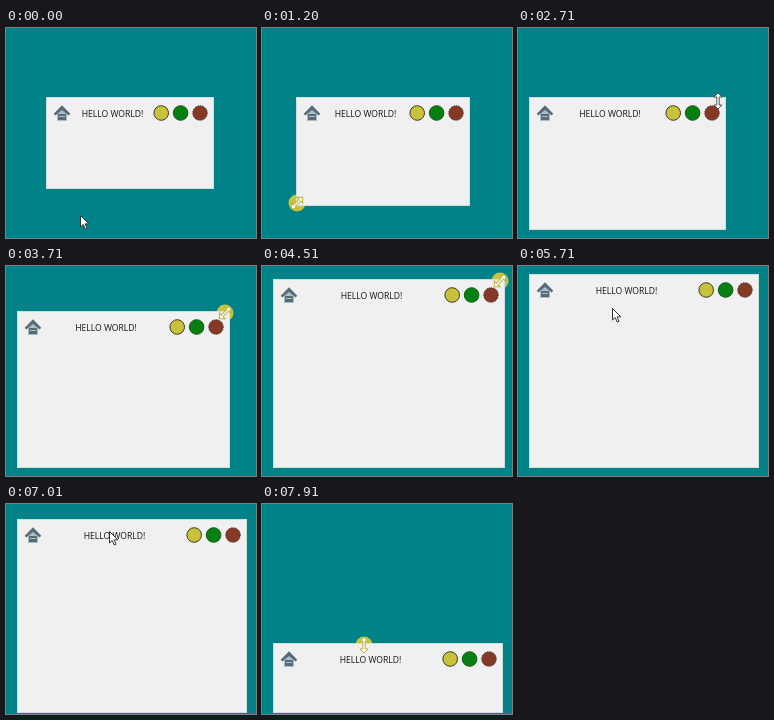
Recreate the animation shown at these times as an HTML page with a canvas. Size 250 by 210 pixels, loop 8000 ms.

```html
<!DOCTYPE html>
<html lang="en">
<head>
<meta charset="utf-8">
<title>Window resize</title>
<style>
  html, body { margin: 0; width: 100%; height: 100%; overflow: hidden; background: #008288; }
  canvas { display: block; width: 250px; height: 210px; }
</style>
</head>
<body>
<canvas id="stage"></canvas>
<script>
const canvas = document.getElementById('stage');
const ctx = canvas.getContext('2d');
const LOOP = 8000;
const RELEASE_DELAY = 200;
const TEAL = '#008288', YELLOW = '#cbc33c';

// Dragged edges follow the cursor, so only the cursor's moves are described.
const moves = [];
function move(start, end, x, y, kind, options = {}) {
  moves.push({ start, end, x, y, kind, drag: '', bow: [0, 0], ...options });
}

move(0, 400, 44, 161, 'arrow');
move(500, 700, 41, 158, 'diagonal');
move(1000, 1900, 12, 199, 'diagonal', { drag: 'left bottom', settle: true });
move(2210, 2610, 199, 73, 'arrow');
move(2610, 3010, 203, 71, 'vertical');
move(3010, 3110, 203, 71, 'diagonal');
move(3310, 4210, 240, 18, 'diagonal', { drag: 'right top' });
move(4210, 4910, 236, 10, 'diagonal', { drag: 'right top' });
move(5110, 6010, 103, 22, 'arrow', { bow: [-62, 28] });
move(6110, 6410, 112, 33, 'arrow', { drag: 'left top right bottom' });
move(6410, 6610, 99, 33, 'arrow', { drag: 'left top right bottom' });
move(6610, 6710, 103, 29, 'arrow', { drag: 'left top right bottom' });
move(6910, 7210, 103, 22, 'arrow');
move(7210, 7310, 102, 17, 'vertical');
move(7510, 7910, 102, 141, 'vertical', { drag: 'top' });

function sceneAt(time) {
  const box = { left: 40, top: 69, right: 208, bottom: 161 };
  let x = 74, y = 187, current = moves[0];
  for (const step of moves) {
    if (time <= step.start) break;
    current = step;
    const p = Math.min(1, (time - step.start) / (step.end - step.start));
    const swing = p < 1 ? Math.sin(Math.PI * p) : 0;
    const dx = (step.x - x) * p + step.bow[0] * swing;
    const dy = (step.y - y) * (step.settle ? 1 - (1 - p) ** 2.2 : p) + step.bow[1] * swing;
    x += dx;
    y += dy;
    for (const edge of step.drag.split(' ').filter(Boolean)) {
      box[edge] += edge === 'left' || edge === 'right' ? dx : dy;
    }
  }
  for (const edge in box) box[edge] = Math.round(box[edge]);
  const pressed = current.drag !== '' && time < current.end + RELEASE_DELAY;
  return { box, x: Math.round(x), y: Math.round(y), kind: current.kind, pressed };
}

function polygon(points, fill, stroke) {
  ctx.beginPath();
  points.forEach(([x, y]) => ctx.lineTo(x, y));
  ctx.closePath();
  ctx.fillStyle = fill;
  ctx.fill();
  if (stroke) { ctx.strokeStyle = stroke; ctx.stroke(); }
}

function disc(x, y, radius, fill, stroke, dash = []) {
  ctx.beginPath();
  ctx.arc(x, y, radius, 0, Math.PI * 2);
  ctx.fillStyle = fill;
  ctx.fill();
  if (!stroke) return;
  ctx.strokeStyle = stroke;
  ctx.setLineDash(dash);
  ctx.stroke();
  ctx.setLineDash([]);
}

function rect(x, y, w, h, fill) {
  ctx.fillStyle = fill;
  ctx.fillRect(x, y, w, h);
}

function at(x, y, paint) {
  ctx.save();
  ctx.translate(x, y);
  paint();
  ctx.restore();
}

function drawHome() {
  polygon([[3, 9], [8, 4], [13, 9], [13, 16], [3, 16]], '#a9bfcc');
  rect(4, 9, 8, 6, '#5a6b78');
  rect(5, 11, 6, 1, '#a9bfcc');
  polygon([[-0.3, 8.7], [8, 0.3], [16.3, 8.7], [14.6, 10.4], [8, 5], [1.4, 10.4]], '#5a6b78');
}

function drawWindow({ left, top, right, bottom }) {
  rect(left, top, right - left, bottom - top, '#d2dede');
  rect(left + 1, top + 1, right - left - 2, bottom - top - 2, '#f0f0f0');
  at(left + 8, top + 8, drawHome);

  ctx.font = '8.6px "Open Sans", "Noto Sans", sans-serif';
  ctx.textAlign = 'center';
  ctx.fillStyle = '#111';
  ctx.fillText('HELLO WORLD!', (left + right) / 2 - 17.5, top + 19.5);

  const y = top + 16;
  disc(right - 52.8, y, 7.3, '#c8c23a', '#3c3c28');
  disc(right - 33.4, y, 7.3, '#087f12', '#0a6012');
  disc(right - 14, y, 7.3, '#853a28', '#33201c', [1, 1]);
}

function drawDoubleArrow(angle, outline) {
  const half = [[0, -8], [4, -4], [1.2, -4], [1.2, 4], [4, 4], [0, 8]];
  const mirrored = half.slice(1, -1).reverse().map(([x, y]) => [-x, y]);
  ctx.rotate(angle);
  polygon([...half, ...mirrored], '#fff', outline);
}

function drawArrow() {
  polygon([[0, 0], [0, 11.5], [2.7, 9], [4.7, 13.5], [6.5, 12.7], [4.6, 8.4], [8.3, 8.3]],
    '#fff', '#333');
}

function draw(time) {
  // The picture advances in steps of a tenth of a second.
  const offset = time < 2310 ? 0 : 10;
  const t = Math.floor((time - offset) / 100) * 100 + offset;
  const { box, x, y, kind, pressed } = sceneAt(t);

  const ratio = window.devicePixelRatio || 1;
  const width = Math.round(250 * ratio), height = Math.round(210 * ratio);
  if (canvas.width !== width || canvas.height !== height) {
    canvas.width = width;
    canvas.height = height;
  }
  ctx.setTransform(ratio, 0, 0, ratio, 0, 0);
  ctx.lineWidth = 1;

  // The press highlight lies behind the window.
  rect(0, 0, 250, 210, TEAL);
  if (pressed) disc(x, y, 8.5, YELLOW);
  drawWindow(box);
  if (kind === 'arrow') {
    at(x + 0.5, y + 0.5, drawArrow);
  } else {
    const angle = kind === 'diagonal' ? Math.PI / 4 : 0;
    at(x, y, () => drawDoubleArrow(angle, pressed ? '#b9b136' : '#555'));
  }
}

const start = performance.now();
function tick() {
  draw((performance.now() - start) % LOOP);
  requestAnimationFrame(tick);
}
tick();
</script>
</body>
</html>
```
